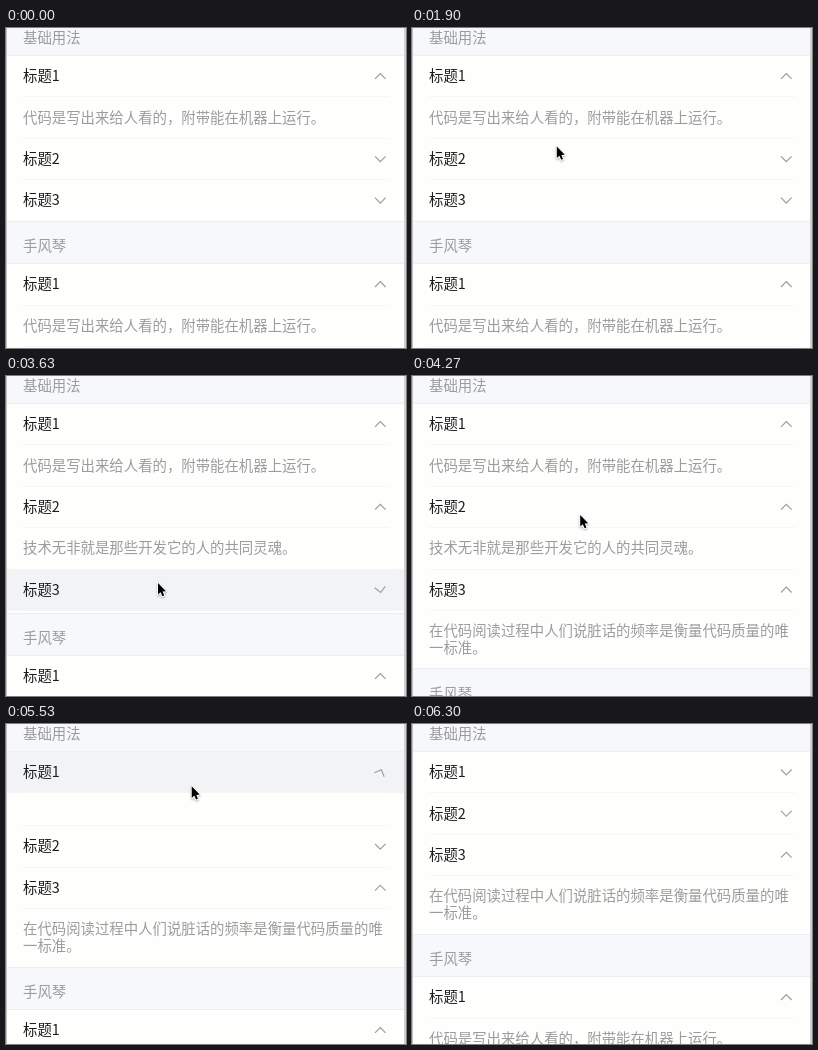
Recreate the animation shown at these times as an HTML page with a canvas. Size 400 by 320 pixels, loop 7.43 s.

```html
<!DOCTYPE html>
<html lang="zh-CN">
<head>
<meta charset="utf-8">
<title>折叠面板</title>
<style>
html, body { margin: 0; width: 100%; height: 100%; overflow: hidden; background: #fefefd; }
canvas { display: block; width: 400px; height: 320px; }
</style>
</head>
<body>
<canvas id="stage"></canvas>
<script>
const W = 400, H = 320, LOOP = 7430;
const ROW = 41.4, HEAD = 42.5, LINE = 17, PAD = 17;
const HEIGHT_MS = 200, ARROW_MS = 300, PRESS_MS = 110;
const PAPER = '#fefefd', GREY = '#9b9c9e', INK = '#1c1c1d';
const EDGE = '#ebeef2', HAIR = '#f6f6f7';

const canvas = document.getElementById('stage');
const ctx = canvas.getContext('2d');
const dpr = window.devicePixelRatio || 1;
canvas.width = W * dpr;
canvas.height = H * dpr;

const motto = ['代码是写出来给人看的，附带能在机器上运行。'];
const groups = [
  { name: '基础用法', items: [
    { title: '标题1', text: motto, open: true, clicks: [5465] },
    { title: '标题2', text: ['技术无非就是那些开发它的人的共同灵魂。'], open: false, clicks: [2790, 4678] },
    { title: '标题3', text: ['在代码阅读过程中人们说脏话的频率是衡量代码质量的唯', '一标准。'], open: false, clicks: [3595] }
  ] },
  { name: '手风琴', items: [
    { title: '标题1', text: motto, open: true, clicks: [] },
    { title: '标题2', text: motto, open: false, clicks: [] }
  ] }
];

const clamp = v => Math.min(1, Math.max(0, v));
const smooth = v => v * v * (3 - 2 * v);
const smoother = v => v * v * v * (10 - 15 * v + 6 * v * v);
const easeIn = v => v * v;
const easeOut = v => 1 - (1 - v) * (1 - v);
const linear = v => v;

// time, x, y, easing towards this point
const path = [
  [1090, 399, 85],
  [1830, 144.8, 117.5, easeOut],
  [1900, 144.8, 118.5, linear],
  [2030, 144.8, 118.5, linear],
  [2270, 144.8, 125, smooth],
  [2980, 144.8, 125, linear],
  [3330, 152, 207, smooth],
  [3760, 152, 207, linear],
  [4270, 168.2, 139, smooth],
  [4360, 168.2, 139, linear],
  [4500, 173, 128, smooth],
  [4675, 173, 128, linear],
  [4830, 181.2, 94.7, easeIn],
  [5170, 185.7, 62.3, easeOut],
  [5590, 185.7, 62.3, linear],
  [6200, 352, 71, easeIn],
  [6260, 388, 74, linear]
];

function cursorAt(t) {
  if (t < 1100 || t >= 6300) return null;
  const i = path.findIndex(p => p[0] > t);
  if (i < 0) return path[path.length - 1].slice(1, 3);
  const [t0, x0, y0] = path[i - 1], [t1, x1, y1, ease] = path[i];
  const k = ease((t - t0) / (t1 - t0));
  return [x0 + (x1 - x0) * k, y0 + (y1 - y0) * k];
}

function stateAt(item, t) {
  const past = item.clicks.filter(c => c <= t);
  const open = item.open !== (past.length % 2 === 1);
  const age = past.length ? t - past[past.length - 1] : Infinity;
  const toward = k => open ? k : 1 - k;
  return {
    open,
    height: toward(smoother(clamp(age / HEIGHT_MS))),
    arrow: toward(smooth(clamp(age / ARROW_MS))),
    pressed: age < PRESS_MS
  };
}

function box(x, y, w, h, color) {
  ctx.fillStyle = color;
  ctx.fillRect(x, y, w, h);
}

function rule(y, inset, color) {
  box(inset, Math.floor(y), W - 2 * inset, 1, color);
}

function label(text, middle, color) {
  ctx.fillStyle = color;
  ctx.fillText(text, PAD, middle + 4.9);
}

function chevron(y, openness) {
  ctx.save();
  ctx.translate(374.3, y);
  ctx.rotate(Math.PI * (0.5 - openness));
  ctx.beginPath();
  ctx.moveTo(-2.7, -5.3);
  ctx.lineTo(2.7, 0);
  ctx.lineTo(-2.7, 5.3);
  ctx.strokeStyle = GREY;
  ctx.lineWidth = 1.15;
  ctx.stroke();
  ctx.restore();
}

function drawItem(item, y, first, t) {
  const s = stateAt(item, t);
  const full = ROW + (item.text.length - 1) * LINE;
  const shown = full * s.height;
  if (s.pressed) box(0, y, W, ROW, '#f2f3f5');
  if (!first) rule(y, PAD, HAIR);
  label(item.title, y + ROW / 2, INK);
  chevron(y + ROW / 2, s.arrow);
  y += ROW;
  if (shown > 0) rule(y, PAD, HAIR);
  // a closing panel is already blank
  if (s.open) {
    ctx.save();
    ctx.beginPath();
    ctx.rect(0, y, W, shown);
    ctx.clip();
    item.text.forEach((line, i) => label(line, y + ROW / 2 + i * LINE, GREY));
    ctx.restore();
  }
  return y + shown;
}

function drawCursor(x, y) {
  const shape = [[0, 0], [0, 11.6], [2.6, 9.3], [4.4, 13.3], [6.2, 12.5], [4.6, 8.6], [8, 8.3]];
  ctx.beginPath();
  shape.forEach(([dx, dy]) => ctx.lineTo(x + dx, y + dy));
  ctx.closePath();
  ctx.lineJoin = 'round';
  ctx.lineWidth = 2;
  ctx.strokeStyle = '#fff';
  ctx.save();
  ctx.shadowColor = 'rgba(0,0,0,0.3)';
  ctx.shadowBlur = 2 * dpr;
  ctx.shadowOffsetY = dpr;
  ctx.stroke();
  ctx.restore();
  ctx.fillStyle = '#000';
  ctx.fill();
}

function draw(t) {
  ctx.setTransform(dpr, 0, 0, dpr, 0, 0);
  ctx.font = '14.4px "Noto Sans CJK SC", "Noto Sans CJK", sans-serif';
  ctx.lineJoin = 'miter';
  box(0, 0, W, H, PAPER);
  let y = -15;
  for (const group of groups) {
    box(0, y, W, HEAD, '#f7f8fb');
    rule(y, 0, EDGE);
    label(group.name, y + 25, GREY);
    y += HEAD;
    rule(y, 0, EDGE);
    group.items.forEach((item, i) => { y = drawItem(item, y, i === 0, t); });
  }
  box(0, 0, 1, H, '#bfbfbf');
  box(398, 0, 2, H, '#d0d0d0');
  const tip = cursorAt(t);
  if (tip) drawCursor(...tip);
}

const start = performance.now();
function tick() {
  draw((performance.now() - start) % LOOP);
  requestAnimationFrame(tick);
}
tick();
</script>
</body>
</html>
```
